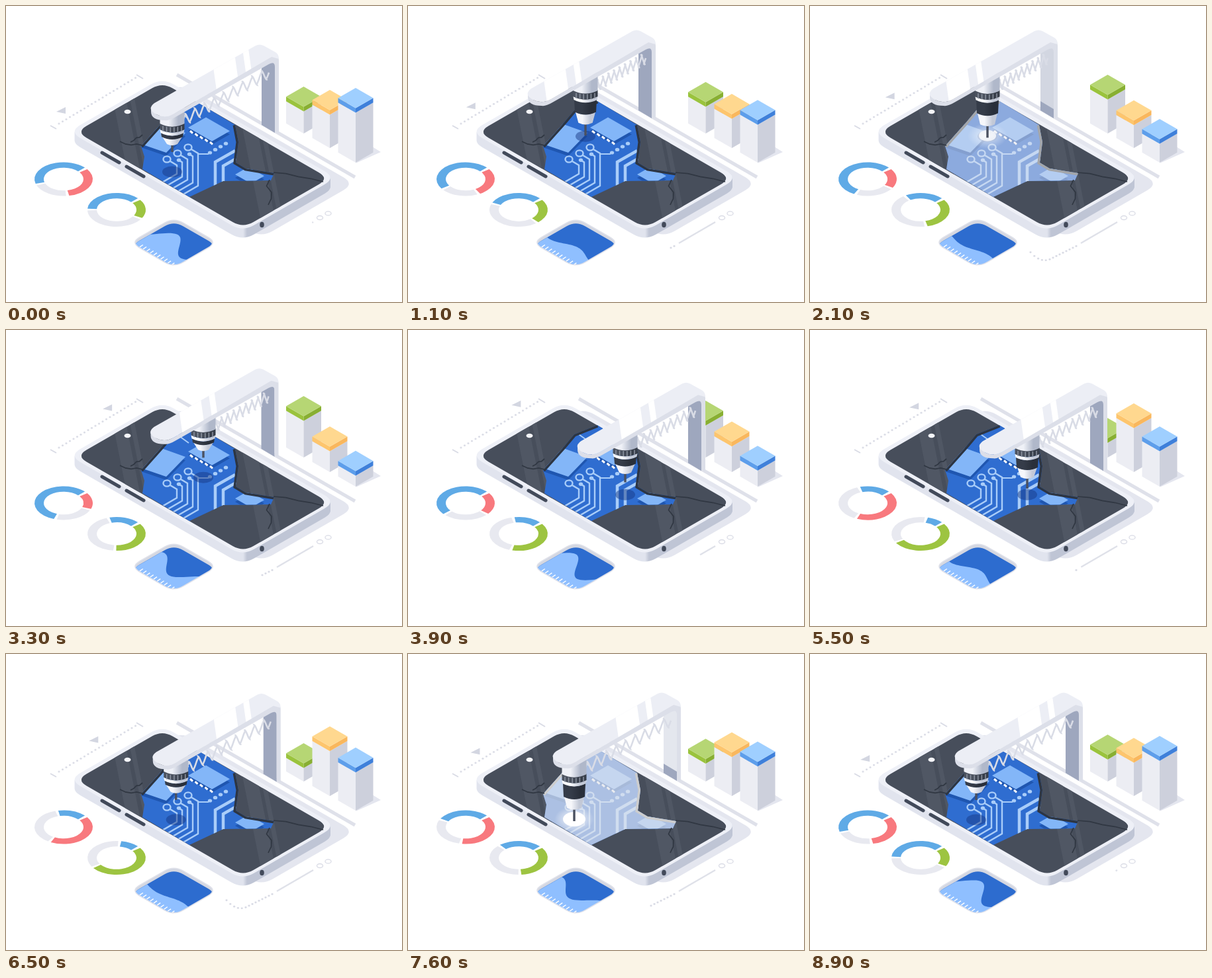
Animation, 598 px wide and 448 px high, one loop 9 s. Source, as an HTML page with a canvas:

```html
<!DOCTYPE html>
<html lang="en">
<head>
<meta charset="utf-8">
<title>Phone repair</title>
<style>
html, body { margin: 0; width: 100%; height: 100%; overflow: hidden; background: #fff; }
canvas { display: block; }
</style>
</head>
<body>
<canvas id="stage" width="598" height="448"></canvas>
<script>
const c = document.getElementById('stage').getContext('2d');
const TAU = Math.PI * 2, LOOP = 9000, LEG = 3000, STEP = 100, ISO = .577;

const mix = (a, b, k) => a + (b - a) * k;
const ease = x => { x = Math.max(0, Math.min(1, x)); return x * x * (3 - 2 * x); };
const ramp = (t, a, b) => ease((t - a) / (b - a));
const wave = (t, period) => Math.cos(t / period * TAU);

// Eased value through three stops, one leg apart; each move takes `span` ms
function tour(t, stops, span = LEG) {
  const n = Math.floor(t / LEG);
  return mix(stops[n], stops[(n + 1) % 3], ramp(t % LEG, 0, span));
}

// Isometric rectangle from its left corner; a runs down, b runs up
const tile = (x, y, a, b) =>
  [[x, y], [x + b, y - b * ISO], [x + a + b, y + (a - b) * ISO], [x + a, y + a * ISO]];

function poly(pts, fill) {
  c.beginPath();
  pts.forEach(p => c.lineTo(...p));
  c.closePath();
  c.fillStyle = fill;
  c.fill();
}

function fill(path, color) { c.fillStyle = color; c.fill(path); }

function stroke(d, color, width) {
  c.strokeStyle = color;
  c.lineWidth = width;
  c.stroke(new Path2D(d));
}

function oval(x, y, rx, ry, color, line) {
  c.beginPath();
  c.ellipse(x, y, rx, ry, 0, 0, TAU);
  c.fillStyle = c.strokeStyle = color;
  c.lineWidth = line;
  line ? c.stroke() : c.fill();
}

function group(draw, x = 0, y = 0, clip) {
  c.save();
  c.translate(x, y);
  if (clip) c.clip(clip);
  draw();
  c.restore();
}

function roundPoly(pts, r) {
  const path = new Path2D(), n = pts.length;
  const toward = (p, q) => {
    const k = r / Math.hypot(q[0] - p[0], q[1] - p[1]);
    return [mix(p[0], q[0], k), mix(p[1], q[1], k)];
  };
  pts.forEach((p, i) => {
    path.lineTo(...toward(p, pts[(i + n - 1) % n]));
    path.quadraticCurveTo(...p, ...toward(p, pts[(i + 1) % n]));
  });
  path.closePath();
  return path;
}

const body = roundPoly(tile(95, 190, 262.5, 141), 20);
const screen = roundPoly(tile(106, 190.5, 252, 130), 18);
const panel = roundPoly(tile(188, 358, 65.5, 65.5), 16);
const leftEdge = '204 212L236 176 251 158 286 144', rightEdge = '346 180L351 206 347 237 362 246 405 253';
const hole = new Path2D(`M${leftEdge}L${rightEdge}L400 264 328 265 277 289 206 247 209 228Z`);
const beamTop = new Path2D('M377 60Q383 57 389 60L407 70Q412 73 412 80L401 77 254 163Q240 171 227 164 212 156 224 147Z');
const beamSide = new Path2D('M219 153V160Q219 173 240 173 246 174 256 168L397 88Q406 83 406 92V190L412 193V82Q412 71 400 77L254 163Q240 171 227 164Z');

function ring(x, y, first, second, color) {
  const parts = [[317 - first, 317, '#5faae6'], [324, 324 + second, color], [second - 30, 311 - first, '#e8e9f0']];
  for (const [from, to, tone] of parts) {
    const a = from * TAU / 360, b = to * TAU / 360;
    c.beginPath();
    c.ellipse(x, y, 44, 25.5, 0, a, b);
    c.ellipse(x, y, 30, 17.3, 0, b, a, true);
    c.fillStyle = tone;
    c.fill();
  }
}

function rings(t) {
  ring(87, 262, tour(t, [153, 212, 50]), tour(t, [115, 53, 155]), '#f8797e');
  ring(167, 308.5, tour(t, [133, 62, 30]), tour(t, [65, 125, 188]), '#9dc441');
}

function bar(x, base, top, [face, left, right]) {
  const w = 26.5, h = w * ISO, y = top + 2 * h, cap = y + 7;
  const side = (s, y0, y1, color) =>
    poly([[x, y0], [x + s * w, y0 - h], [x + s * w, y1 - h], [x, y1]], color);
  side(-1, cap, base, '#ecedf3');
  side(1, cap, base, '#cdd0dc');
  side(-1, y, cap, left);
  side(1, y, cap, right);
  poly(tile(x - w, top + h, w, w), face);
}

function bars(t) {
  poly([[528, 238], [566, 221], [550, 211]], '#e4e6ef');
  bar(449.5, 193, tour(t, [122, 99, 136]), ['#b6d674', '#9ac33d', '#88af32']);
  bar(489, 215, tour(t, [127, 147, 108]), ['#ffd88f', '#fdc56d', '#f9b75d']);
  bar(528, 237, tour(t, [124, 184, 143]), ['#9fcfff', '#5d9eeb', '#3f80da']);
}

function slider(t) {
  stroke('M67 181L76 186M197 104L207 110', '#d9dbe5', 2);
  for (let i = 0; i <= 21; i++) oval(80 + i * 5.5, 178 - i * 3.3, 1.6, 1.5, '#dcdee7');
  const dx = 42 * (1 - wave(t, LOOP));
  group(() => poly([[76, 160], [90, 153], [90, 163]], '#d3d6e1'), dx, -dx * ISO);
}

function pointer(t) {
  for (const x of [474, 486.5]) oval(x, 320.5 - (x - 474) * .53, 4.5, 3, '#d9dbe5', 1.3);
  const len = 2 + 74 * (1 - wave(t, LOOP / 2));
  c.setLineDash([len, 999]);
  stroke('M464 327L409 359', '#dfe1e9', 2.4);
  c.setLineDash([]);
  for (let i = 0; i < 14 && len > 63 + 5.6 * i; i++) {
    const turn = Math.max(0, i - 8);
    oval(402 - 5 * i - .8 * turn, 363.5 + 2.5 * i - turn * (.3 + .87 * turn), 1.6, 1.4, '#d9dbe5');
  }
}

function chart(t) {
  const at = (u, v) => [188 + 66 * (u + v), 358 + 38 * (u - v)];
  const height = .28 + .2 * wave(t + 500, LOOP / 2);
  fill(panel, '#d4d7e1');
  group(() => group(() => {
    c.fillStyle = '#2d6ccf';
    c.fillRect(180, 310, 150, 100);
    const area = [at(0, -.2)];
    for (let u = 0; u <= 1.21; u += .03)
      area.push(at(u, .33 + height * (.5 + .5 * wave(u - .32 - t / 4500, 1))));
    poly([...area, at(1.2, -.2)], '#8fbfff');
    for (let i = 0; i < 10; i++) stroke(`M${at(.13 + i * .08, .08)}l5 -3.4`, '#fff', 1.4);
  }, 0, 5, panel), 0, 0, panel);
  c.strokeStyle = '#dfe1ea';
  c.lineWidth = 1.5;
  c.stroke(panel);
}

function chip(pts) {
  group(() => poly(pts, '#1f56b0'), 0, 5);
  poly(pts, '#83b6f8');
}

function circuit() {
  const blue = '#2f6dd0', pale = '#a9cdf9';
  c.fillStyle = blue;
  c.fillRect(190, 130, 230, 170);
  chip([[232, 178], [271, 192], [242, 222], [204, 209]]);
  chip(tile(275, 184, 36, 27));
  chip(tile(346, 255, 24, 20));
  for (let i = 0; i < 5; i++) stroke(`M${278 + i * 7.5} ${189 + i * 4.2}l4 3.5`, '#fff', 3);
  for (let i = 0; i < 4; i++) oval(308 + i * 8, 222 - i * 4.6, 3.2, 2.6, pale);
  stroke('M289 224H306M258 158L276 171', pale, 2);

  // Nested tracks; every other one starts later, with a dot in place of a ring
  for (let i = 0; i < 5; i++) {
    const x = 243 + i * 8, y = 232 - i * 4.5, lag = i % 2 * 10;
    stroke(`M${x + lag} ${y + lag * ISO}L${x + 15} ${y + 9}v${13 + 9 * i}l-60 35`, pale, 2.4);
    if (lag) oval(x + lag, y + lag * ISO, 3.2, 2.8, pale);
    else {
      oval(x, y, 5.5, 4.6, blue);
      oval(x, y, 5.5, 4.6, pale, 2.4);
    }
  }
  for (const x of [316, 328]) stroke(`M${x} 272V${x * .5 + 78}l30 -17`, pale, 4.5);
}

// Thin broken line with seeded jitter
function crack(x0, y0, x1, y1) {
  let seed = x0 * 7 + y1, d = `M${x0} ${y0}`;
  for (let i = 1; i <= 4; i++) {
    seed = seed * 16807 % 2147483647;
    const off = i < 4 ? seed % 9 - 4 : 0, steep = Math.abs(y1 - y0) > Math.abs(x1 - x0);
    d += `L${mix(x0, x1, i / 4) + (steep ? off : 0)} ${mix(y0, y1, i / 4) + (steep ? 0 : off * .6)}`;
  }
  stroke(d, '#303742', 1.7);
}

function phone(rig) {
  stroke('M258 104L527 259', '#dfe1ea', 5);
  group(() => fill(body, '#e4e6ef'), 28, 9);
  const side = c.createLinearGradient(358, 0, 364, 0);
  side.addColorStop(0, '#e1e4ee');
  side.addColorStop(1, '#bfc5d5');
  for (let y = 14; y > 0; y--) group(() => fill(body, side), 0, y);
  fill(body, '#eef0f7');
  fill(screen, '#474e5b');
  group(() => {
    for (const [x, w] of [[155, 20], [181, 7], [342, 22], [369, 7]])
      poly([[x, 110], [x + w, 110], [x + w + 46, 340], [x + 46, 340]], '#505764');
  }, 0, 0, screen);
  group(() => {
    circuit();
    oval(rig.x, rig.y, 15, 8.5, 'rgba(22,55,130,.48)');
    c.fillStyle = `rgba(226,228,235,${.7 * rig.glow})`;
    c.fillRect(190, 130, 230, 170);
    const rim = [45, 53, 66].map(v => mix(v, 205, rig.glow));
    stroke(`M${leftEdge}M${rightEdge}`, `rgb(${rim})`, 7);
  }, 0, 0, hole);
  crack(172, 205, 206, 211);
  crack(188, 206, 206, 195);
  crack(404, 252, 479, 266);
  crack(398, 263, 396, 301);
  oval(183.5, 160, 5, 3.2, '#f4f5f9');
  c.lineCap = 'round';
  stroke('M145 222l26 15M182 243l26 15', '#424a5a', 5);
  c.lineCap = 'butt';
  oval(386.5, 331, 3.3, 4.3, '#424a5a');
}

// Section of the tool: a cylinder or cone with rounded rims
function band(y0, y1, w0, w1, from, to) {
  const shade = c.createLinearGradient(-w0, 0, w0, 0);
  shade.addColorStop(.35, from);
  shade.addColorStop(.75, to);
  fill(new Path2D(`M${-w0} ${y0}L${-w1} ${y1}Q0 ${y1 + w1 * .5} ${w1} ${y1}L${w0} ${y0}Q0 ${y0 + w0 * .5} ${-w0} ${y0}Z`), shade);
}

function tool(k) {
  c.translate(0, 4 * k);
  const black = 198 + 14 * k, end = 209 + 20 * k;
  c.fillStyle = '#4a5160';
  c.fillRect(-1.7, end, 3.4, 12 + 8 * k);
  band(black, end, 15, 8 + 3 * k, '#f6f7fb', '#c3c9d7');
  band(192, black, 17, 16, '#353c49', '#292f3a');
  band(187, 192, 18.5, 17.5, '#fafbfd', '#c3c9d7');
  band(177, 187, 18.5, 18.5, '#4c5360', '#373e4a');
  for (let x = -14; x <= 14; x += 5.6)
    stroke(`M${x} ${181 + 2.5 * (1 - x * x / 300)}v8`, '#9299a6', 1.4);
  band(146, 178, 18.5, 18.5, '#eff1f7', '#b0b8ca');
}

function spark(x, y, glow, t) {
  if (!glow) return;
  const r = 15 + 2 * Math.sin(t / 70);
  const halo = c.createRadialGradient(0, 0, 4, 0, 0, 30);
  halo.addColorStop(0, 'rgba(255,255,255,.8)');
  halo.addColorStop(1, 'rgba(255,255,255,0)');
  group(() => {
    c.globalAlpha = glow;
    c.scale(1, .65);
    oval(0, 0, 30, 30, halo);
    oval(0, 0, r, r, '#fff');
  }, x, y);
}

function spring(from, to) {
  c.beginPath();
  for (let i = 0; i <= 240; i++) {
    const a = i / 240 * 9 * TAU, x = mix(from, to, i / 240);
    c.lineTo(x + 1.5 * Math.sin(2 * a), 187 - .56 * (x - 243) - 9 * Math.tanh(1.6 * Math.sin(a)));
  }
  c.strokeStyle = '#d9dce6';
  c.lineWidth = 2.6;
  c.stroke();
}

function gantry(rig, t) {
  const post = (low, color) => poly([[386, 90], [406, 78], [406, low], [386, low - 12]], color);
  post(192, '#9ea7be');
  c.globalAlpha = rig.glow;
  post(178, '#e4e7ee');
  c.globalAlpha = 1;
  spring(267 + rig.slide, 397);
  group(() => {
    spark(0, 250, rig.glow, t);
    tool(rig.drop);
  }, 251 + rig.slide, -ISO * rig.slide);
  fill(beamSide, '#dcdfe9');
  fill(beamTop, '#eceef5');
  group(() => {
    c.clip(beamTop);
    c.translate(rig.shine, -ISO * rig.shine);
    for (const [x, w] of [[307, 35], [355, 9]])
      poly([[x, 50], [x + w, 50], [x + w + 12, 135], [x + 12, 135]], '#fff');
  });
}

// Rail shift, tool slide along the beam and highlight shift at each stop
function pose(t) {
  const p = t % LEG, move = stops => tour(t, stops, 600);
  const rail = move([0, -38, 37]), slide = move([0, 55, 40]);
  return {
    rail, slide,
    shine: move([0, -70, -32]),
    drop: ramp(p, 700, 1200) * (1 - ramp(p, 2300, 2800)),
    glow: ramp(p, 1150, 1400) * (1 - ramp(p, 2000, 2300)),
    x: 251 + rail + slide,
    y: 251 + (rail - slide) * ISO
  };
}

function draw(t) {
  const rig = pose(t);
  c.fillStyle = '#fff';
  c.fillRect(0, 0, 598, 448);
  slider(t);
  bars(t);
  rings(t);
  chart(t);
  phone(rig);
  pointer(t);
  group(() => gantry(rig, t), rig.rail, rig.rail * ISO);
}

const begin = performance.now();
function tick() {
  const t = Math.max(0, performance.now() - begin);
  draw(Math.floor(t / STEP) * STEP % LOOP);
  requestAnimationFrame(tick);
}
tick();
</script>
</body>
</html>
```
